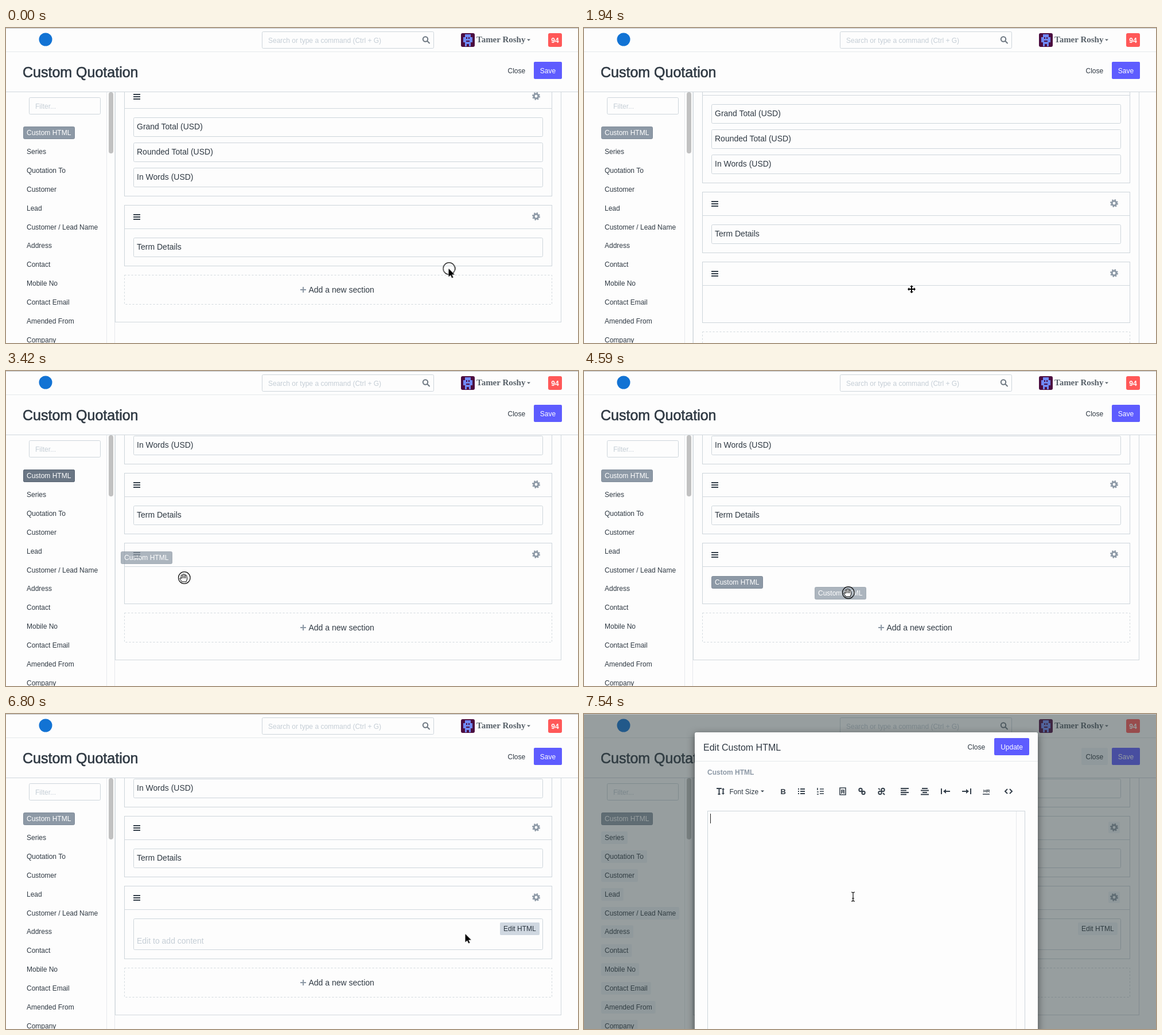
These frames come from a looping animation (997x550 px, 7990 ms). An HTML page:

```html
<!DOCTYPE html>
<html lang="en">
<head>
<meta charset="utf-8">
<title>Custom Quotation</title>
<style>
  html, body { margin: 0; width: 100%; height: 100%; overflow: hidden; background: #fdfdfd; }
  svg { display: block; width: 997px; height: 550px; font: 12px "Liberation Sans", Arial, sans-serif; }
  text { fill: #2f3943; white-space: pre; }
  .box { fill: #fdfdfd; stroke: #cdd5db; }
  .line { fill: none; stroke: #d1d8dd; }
  .faint { fill: none; stroke: #e6e9ec; }
  .hint { fill: #c5ced6; }
  .muted { fill: #8d99a6; }
  .white { fill: #fff; }
  .body { font-size: 14px; }
  .chip { fill: #f0f4f7; opacity: 0; }
  .icon { fill: none; stroke: #36414c; stroke-width: 2; }
  .outlined { fill: #000; stroke: #fff; stroke-width: 1; paint-order: stroke; }
  .hand { fill: #fff; stroke: #000; stroke-linejoin: round; }
</style>
</head>
<body>
<script>
const FRAMES = 54, LOOP = 7990;

// Drawing helpers
const text = (x, y, s, cls = '', extra = '') => `<text x="${x}" y="${y}" class="${cls}" ${extra}>${s}</text>`;
const rect = (x, y, w, h, attrs) => `<rect x="${x}" y="${y}" width="${w}" height="${h}" ${attrs}/>`;
const path = (d, attrs) => `<path d="${d}" ${attrs}/>`;
const group = (id, ...parts) => `<g id="${id}">${parts.join('')}</g>`;

const field = (y, label) => rect(222.5, y + .5, 713, 33, 'rx="2" class="box"') + text(228, y + 21, label, 'body');

const gear = (x, y) =>
  rect(x - 10, y - 10, 20, 20, 'rx="2" class="chip"') +
  `<g fill="none" stroke="#8d99a6"><circle cx="${x}" cy="${y}" r="3.9" stroke-width="3"/>
   <circle cx="${x}" cy="${y}" r="5.7" stroke-width="2.6" stroke-dasharray="2.24"/></g>`;

const section = (top, height, id = '') =>
  rect(206.5, top + .5, 745, height, `id="${id}" class="box"`) +
  path(`M206 ${top + 41.5}H952`, 'class="line"') +
  path(`M222 ${top + 17}h12m-12 4h12m-12 4h12`, 'class="icon"') +
  gear(924, top + 20);

const tag = (x, y, attrs = '') =>
  rect(x + .5, y + .5, 89, 21, `rx="2" fill="#8d99a6" stroke="#7f8b98" ${attrs}`) +
  text(x + 6, y + 15, 'Custom HTML', 'white');

const button = (x, y, w, label) =>
  rect(x, y, w, 30, 'rx="2" fill="#5e5cff"') + text(x + w / 2, y + 20, label, 'white', 'text-anchor="middle"');

const page = group('page',
  group('tail',
    rect(190.5, -300.5, 777, 814, 'class="line"'),
    rect(206.5, 431.5, 745, 51, 'class="line" stroke-dasharray="3 3"'),
    path('M513 457h10m-5-5v10', 'stroke="#8d99a6" stroke-width="2"'),
    text(527.5, 462, 'Add a new section', 'body'),
    path('M528 464.5h115.5', 'id="underline" stroke="#111"')),
  section(99, 194),
  field(156, 'Grand Total (USD)'), field(200, 'Rounded Total (USD)'), field(244, 'In Words (USD)'),
  section(309, 106), field(366, 'Term Details'),
  group('added',
    section(431, 106, 'addedBox'),
    group('placeholder', tag(222, 489)),
    group('content',
      rect(222.5, 488.5, 713, 54, 'rx="2" class="box"'),
      text(228, 532, 'Edit to add content', 'hint body'),
      rect(861, 495, 69, 22, 'rx="2" fill="#f0f4f7"'),
      rect(861, 495, 69, 22, 'id="editHover" rx="2" fill="#cfd7e0"'),
      text(867, 510, 'Edit HTML'))));

const names = ['Series', 'Quotation To', 'Customer', 'Lead', 'Customer / Lead Name', 'Address', 'Contact',
  'Mobile No', 'Contact Email', 'Amended From', 'Company'];

const sidebar =
  path('M175.5 112V550M189.5 112V550', 'class="faint"') +
  rect(179, 112, 8, 107, 'rx="4" fill="#c1c1c1"') +
  rect(40.5, 121.5, 124, 29, 'rx="2" class="box"') + text(51, 141, 'Filter...', 'hint') +
  tag(30, 172) + group('pressed', tag(30, 172, 'style="fill:#6a7684;stroke:#586472"')) +
  names.map((name, i) => {
    const y = Math.round(219.9 + i * 32.9);
    return rect(30, y - 15, 0, 22, 'rx="2" class="chip"') + text(36, y, name, 'item');
  }).join('');

const header =
  rect(0, 0, 997, 111, 'fill="#fdfdfd"') +
  path('M0 .5H997', 'stroke="#bfc1c3"') +
  path('M0 41.5H997', 'class="faint"') + path('M0 111.5H997', 'class="line"') +
  '<circle cx="69" cy="20" r="11.5" fill="#1273d4"/>' +
  rect(446.5, 6.5, 299, 29, 'rx="2" class="box"') +
  text(457, 26, 'Search or type a command (Ctrl + G)', 'hint') +
  '<g fill="none" stroke="#6c7680" stroke-width="2"><circle cx="731" cy="19.5" r="4.2"/><path d="M734 22.5l4.5 4.5"/></g>' +
  rect(793, 9, 24, 24, 'rx="3" fill="#4c0d40"') +
  path('M800 11h10v5h3v9h-3v7h-3v-4h-4v4h-3v-7h-3v-9h3z', 'fill="#7088f5"') +
  path('M802 16h2v3h-2zm4 0h2v3h-2zM802 22h6v2h-6z', 'fill="#4c0d40"') +
  text(820, 25, 'Tamer Roshy', '', 'style="font:bold 15px \'Liberation Serif\',serif;fill:#59626a"') +
  path('M908 19.5h6l-3 3z', 'fill="#59626a"') +
  rect(945, 9, 24, 24, 'rx="3" fill="#ff5858"') +
  text(957, 26, '94', 'white', 'text-anchor="middle" font-weight="bold"') +
  text(29, 86, 'Custom Quotation', '', 'font-size="25" stroke="#2f3943" stroke-width=".6"') +
  rect(867, 59, 46, 30, 'rx="2" class="chip"') + text(874.5, 79, 'Close') + button(920, 59, 49, 'Save');

const toolbar =
  path('M231 130h9m-4.500 0v10m-2 0h4M242.500 131v8', 'class="icon"') +
  path('M240 132l2.500-3 2.500 3zm0 6l2.500 3 2.500-3z', 'fill="#36414c"') +
  text(253.500, 140, 'Font Size') + path('M308 133.500h6l-3 3z', 'fill="#36414c"') +
  text(342.500, 140, 'B', '', 'font-size="13" font-weight="bold"') +
  path('M373 131h2m2 0h8m-12 4h2m2 0h8m-12 4h2m2 0h8', 'class="icon"') +
  path('M407 129v4m-1 3h3m-3 4h3m2-9h7m-7 4h7m-7 4h7', 'class="icon" style="stroke-width:1.600"') +
  path('M446 129h10v12h-10zM449 139v-6h4v6m-4-3h4', 'class="icon" style="stroke-width:1.600"') +
  '<g class="icon"><circle cx="482" cy="132.500" r="2.700"/><circle cx="487" cy="137.500" r="2.700"/><path d="M483 134l3 3"/>' +
  '<circle cx="521" cy="132.500" r="2.700"/><circle cx="516" cy="137.500" r="2.700"/><path d="M513 130l3 2m5 6l3 3"/></g>' +
  path('M552 130h14m-14 3.500h10m-10 3.500h14m-14 3.500h10', 'class="icon"') +
  path('M589 130h10m-12 3.500h14m-11 3.500h8m-11 3.500h14', 'class="icon"') +
  path('M623 130v10m4-5h11M674 130v10m-4-5h-11', 'class="icon"') +
  path('M626 135l5-4v8zm45 0l-5-4v8z', 'fill="#36414c"') +
  text(696, 137, 'HR', '', 'font-size="8" font-weight="bold"') + path('M695 140h12', 'class="icon" style="stroke-width:1.500"') +
  path('M738 131l-4 4 4 4m4-8l4 4-4 4', 'class="icon"');

const modal = group('modal',
  rect(193, 32, 598, 800, 'rx="3" fill="#fdfdfd" style="filter:drop-shadow(0 4px 7px #0008)"'),
  path('M193 82.5H791', 'class="faint"'),
  text(208, 64, 'Edit Custom HTML', '', 'font-size="16"'),
  text(668.5, 62, 'Close'), button(715, 42, 61, 'Update'),
  text(215, 106, 'Custom HTML', 'muted', 'font-weight="bold"'),
  toolbar,
  rect(215.5, 169.5, 553, 600, 'class="box"'), path('M753.5 170V760', 'class="faint"'),
  path('M220.5 174v17', 'id="caret" stroke="#222"'));

const cursor = group('cursor',
  '<circle id="ring" cx=".8" r="10.3" fill="none" stroke="#111" stroke-width="1.2"/>',
  path('M0 0V14.5L3.4 11.3 5.8 16.6 8 15.6 5.6 10.500H10.3Z', 'id="arrow" class="outlined"'),
  path('M-1.5 3.500a1.300 1.300 0 0 1 2.600 0V8.500l5.500 1.300c1.200.4 1.600 1 1.500 2.200l-.7 3.500-1 3H0L-4.300 12.500c-.6-1.200.7-2 1.800-1.200l1 .9ZM1.100 8.500v3m2.500-2v2', 'id="link" class="hand"'),
  path('M0-7 3-4H1V-1H4V-3L7 0 4 3V1H1V4H3L0 7-3 4H-1V1H-4V3L-7 0-4-3V-1H-1V-4H-3Z', 'id="cross" class="outlined" style="stroke-width:2"'),
  path('M-3.500 7L-6.800 2c-.8-1.400.6-2.400 1.700-1.300L-4.300 1.500-5-3.500c-.1-1.600 1.800-1.800 2.200-.4L-2.200-5.500c.2-1.400 2.200-1.400 2.300 0 .4-1.300 2.300-1 2.300.5l.3 1c.6-1.200 2.200-.7 2.100.6L5.800 2 4 7ZM-2.300-4V1M.2-5V1M2.600-4V1', 'id="grab" class="hand"'),
  path('M-3-8q3 0 3 2V6q0 2-3 2M3-8q-3 0-3 2M3 8q-3 0-3-2M-2 3H2', 'id="beam" fill="none" stroke="#111" stroke-width="1.2"'));

document.body.innerHTML = `<svg viewBox="0 0 997 550">${page}${sidebar}${header}
  ${group('dragged', `<g opacity=".72">${tag(0, 0)}</g>`)}
  ${rect(0, 1, 997, 549, 'id="dim" fill="#334143"')}${modal}${cursor}</svg>`;

document.querySelectorAll('.item').forEach(item =>
  item.previousElementSibling.setAttribute('width', item.getComputedTextLength() + 12));

// Every key is [frame, value]; values advance once per frame, or jump when held.
function track(selector, prop, keys, hold = false) {
  const frames = keys.map(([frame, value], i) => {
    const span = (keys[i + 1]?.[0] ?? FRAMES) - frame;
    return { offset: frame / FRAMES, [prop]: value, easing: hold || span < 1 ? 'step-end' : `steps(${span})` };
  });
  if (keys.at(-1)[0] < FRAMES) frames.push({ offset: 1, [prop]: keys.at(-1)[1] });
  document.querySelectorAll(selector).forEach(el =>
    el.animate(frames, { duration: LOOP, iterations: Infinity, delay: -10 }));
}
const move = (selector, keys, hold) =>
  track(selector, 'transform', keys.map(([f, x, y]) => [f, `translate(${x}px, ${y}px)`]), hold);
const show = (selector, ...ranges) =>
  track(selector, 'opacity', [[0, 0], ...ranges.flatMap(([from, to]) => [[from, 1], [to, 0]])], true);

// Page layout
move('#page', [[0, 0, 0], [9, 0, 0], [13, 0, -23], [15, 0, -131]]);
move('#tail', [[0, 0, 0], [8, 0, 122], [33, 0, 143]], true);
track('#addedBox', 'height', [[0, '106px'], [33, '127px']], true);
show('#added', [8, 54]);
show('#underline', [4, 8]);
show('#pressed', [18, 24]);
show('#placeholder', [25, 33]);
show('#content', [33, 54]);
show('#editHover', [41, 47]);
show('.chip', [47, 54]);

// Dragged tag trails the pointer at first
show('#dragged', [21, 33]);
move('#dragged', [[0, 30, 172], [21, 36, 178], [23, 200, 315], [26, 396, 446], [28, 400, 384], [29, 400, 384], [31, 402, 377]]);

// Dialog
track('#dim', 'opacity', [[0, 0], [46, 0], [48, .5]]);
track('#modal', 'opacity', [[0, 0], [47, 0], [50, 1]]);
move('#modal', [[0, 0, -150], [48, 0, -110], [49, 0, -40], [50, 0, 0]], true);
show('#caret', [50, 54]);

// Pointer
move('#cursor', [[0, 771.5, 420], [5, 573, 457], [8, 571, 456], [15, 571, 456], [17, 100, 190], [19, 88, 182],
  [20, 88, 182], [21, 110, 200], [23, 310, 361], [26, 454, 456], [28, 458, 394], [29, 458, 394], [31, 460, 387],
  [33, 460, 387], [37, 643, 397], [42, 893, 376], [44, 893, 376], [46, 800.5, 384], [50, 469, 319]]);
show('#ring', [0, 2], [6, 8], [19, 33], [43, 44]);
show('#arrow', [0, 4], [16, 17], [34, 41], [45, 50]);
show('#link', [4, 8], [41, 45]);
show('#cross', [8, 16]);
show('#grab', [17, 34]);
show('#beam', [50, 54]);
</script>
</body>
</html>
```
